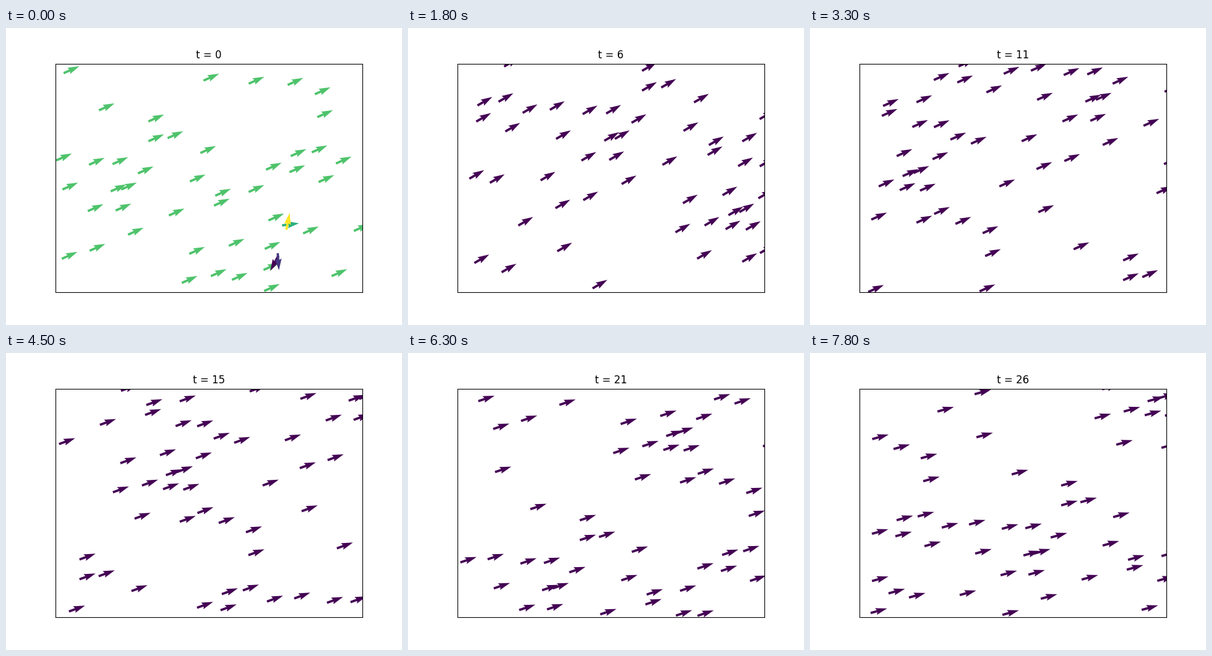
These frames come from a looping animation (640 by 480 pixels, 8000 ms). A matplotlib script:

```python
import numpy as np
import matplotlib.pyplot as plt
from matplotlib.animation import FuncAnimation

# Coordinates are stage pixels, y pointing down; the field wraps around.
ORIGIN = np.array([80, 57.6])
SIZE = np.array([496, 369.6])
SPEED = 28.5
STEPS = np.arange(27)

# Initial tails of the arrows; the last ones are the wanderers.
STARTS = np.array([
    (94, 74), (320, 86), (393, 91), (456, 93), (500, 108), (504, 145),
    (151, 134), (231, 152), (231, 184), (262, 179), (315, 203), (82, 215),
    (135, 222), (173, 221), (214, 236), (298, 249), (421, 230), (461, 208),
    (495, 202), (459, 234), (534, 220), (506, 250), (393, 266), (339, 272),
    (337, 288), (92, 262), (170, 265), (187, 262), (133, 297), (178, 296),
    (264, 304), (198, 335), (91, 374), (136, 361), (297, 366), (361, 353),
    (481, 333), (563, 329), (419, 358), (285, 413), (332, 402), (366, 408),
    (527, 402),
    (425, 312), (447, 320), (454, 327), (417, 392), (441, 369), (440, 365),
    (418, 426),
]) - (0.8, 1)

# Headings of the wanderers before they join; SAME is the flock's heading.
SAME = np.nan
WANDER = np.array([
    (SAME, 40, SAME), (7, 33, SAME), (79, 140, SAME), (SAME, -37, 72),
    (-118, 44, 94), (-86, 63, 72), (SAME, SAME, -13),
]).T

# Key points of the flock: step, distance right, distance up, heading
KEY, RIGHT, UP, HEADING = np.array([
    (0, 0, 0, 24), (2, 51.3, 25.3, 27.5), (6, 148.1, 81.8, 30),
    (11, 275.9, 145, 24), (15, 384.6, 186.9, 20), (21, 543.5, 250.2, 18.5),
    (26, 671.8, 306.4, 15.5),
]).T


def simulate():
    count = len(STARTS)
    right, up = (np.gradient(np.interp(STEPS, KEY, d)) for d in (RIGHT, UP))
    common = np.degrees(np.arctan2(up, right))
    common[KEY.astype(int)] = HEADING
    headings = np.repeat(common[:, None], count, axis=1)

    drift = np.column_stack([np.interp(STEPS, KEY, RIGHT),
                             -np.interp(STEPS, KEY, UP)])
    moves = np.repeat(np.diff(drift, axis=0)[:, None], count, axis=1)

    turned, who = np.nonzero(~np.isnan(WANDER))
    own = WANDER[turned, who]
    who += count - WANDER.shape[1]
    headings[turned, who] = own
    a = np.radians(own)
    moves[turned, who] = SPEED * np.column_stack([np.cos(a), -np.sin(a)])

    paths = np.concatenate([STARTS[None], STARTS + np.cumsum(moves, axis=0)])
    return (paths - ORIGIN) % SIZE + ORIGIN, headings


paths, headings = simulate()


def components(t):
    a = np.radians(headings[t])
    return np.cos(a), np.sin(a), headings[t]


fig, ax = plt.subplots(figsize=(6.4, 4.8), dpi=100)
ax.set(xlim=(80, 576), ylim=(427.2, 57.6), xticks=[], yticks=[])
title = ax.set_title("t = 0")
arrows = ax.quiver(*paths[0].T, *components(0), cmap="viridis")


def update(frame):
    t = frame // 3
    arrows.set_offsets(paths[t])
    arrows.set_UVC(*components(t))
    arrows.set_clim(headings[t].min(), headings[t].max())
    title.set_text(f"t = {t}")
    return arrows, title


anim = FuncAnimation(fig, update, frames=80, interval=100,
                     repeat=True, repeat_delay=0)
plt.show()
```
